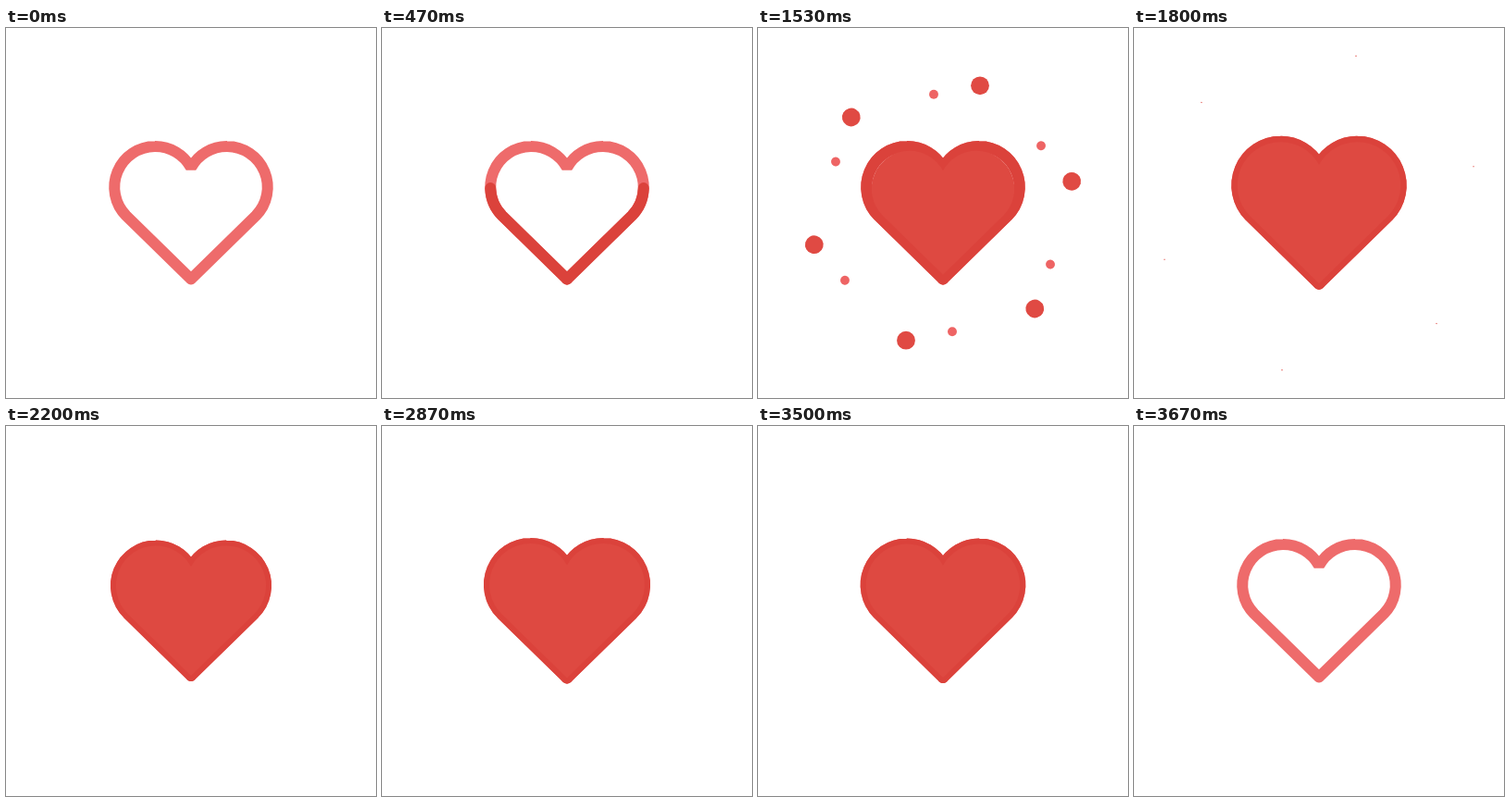
An HTML page that plays this animation: 400 px wide and 400 px high, repeating every 4.16 s.

```html
<!DOCTYPE html>
<html lang="en">
<head>
<meta charset="utf-8">
<title>Like button</title>
<style>
html, body { margin: 0; height: 100%; overflow: hidden; background: #fff; }
svg { display: block; width: 100vw; height: 100vh; }
</style>
</head>
<body>
<svg viewBox="0 0 400 400">
  <g id="sparks"></g>
  <g id="heart" fill="none" stroke-width="12" stroke-linecap="round" stroke-linejoin="bevel">
    <path id="base" stroke="#ee6b6b"/>
    <g id="trace" stroke="#db423b">
      <path pathLength="1"/>
      <path pathLength="1" transform="matrix(-1 0 0 1 400 0)"/>
    </g>
    <path id="fill" fill="#de4941"/>
  </g>
</svg>
<script>
const LOOP = 4160;
const $ = id => document.getElementById(id);
const clamp = x => Math.min(1, Math.max(0, x));
const span = (t, start, length) => clamp((t - start) / length);

// Cubic Bezier easing, solved by bisection
function bezier(x1, y1, x2, y2) {
  const at = (a, b, s) => 3 * a * s * (1 - s) ** 2 + 3 * b * s * s * (1 - s) + s ** 3;
  return x => {
    let lo = 0, hi = 1;
    for (let i = 0; i < 24; i++) {
      const mid = (lo + hi) / 2;
      if (at(x1, x2, mid) < x) lo = mid; else hi = mid;
    }
    return at(y1, y2, hi);
  };
}
const ease = bezier(.25, .1, .25, 1);
const easeOut = bezier(0, 0, .58, 1);

const half = "M200 271.5L130 203A44 44 0 0 1 161 128A44 44 0 0 1 200 151";
const whole = half + "A44 44 0 0 1 239 128A44 44 0 0 1 270 203L200 271.5";
$("base").setAttribute("d", whole);
$("fill").setAttribute("d", whole);
const traces = [...$("trace").children];
traces.forEach(p => p.setAttribute("d", half));

// Six arms, each with a large and a small dot
const sparks = [];
for (let i = 0; i < 6; i++) {
  for (const [x, end, size, color] of [[40, 170, 10, "#e04a43"], [-10, 156, 5, "#ee6464"]]) {
    const dot = document.createElementNS("http://www.w3.org/2000/svg", "circle");
    dot.setAttribute("cx", x);
    dot.setAttribute("fill", color);
    dot.setAttribute("transform", `translate(200 200) rotate(${i * 60})`);
    $("sparks").append(dot);
    sparks.push({ dot, end, size });
  }
}

const show = (el, on) => el.setAttribute("visibility", on ? "visible" : "hidden");
const zoom = (el, s) =>
  el.setAttribute("transform", `translate(200 200) scale(${s}) translate(-200 -200)`);

function heartScale(t) {
  if (t >= 1550 && t < 2417) {
    const d = t - 1550;
    return 1 + .154 * Math.exp(-.003 * d) * Math.sin(Math.PI * d / 400);
  }
  if (t >= 2850 && t < 3665) {
    const phase = (t - 2850) / 330 % 1;
    return 1 + .11 * (1 - Math.abs(1 - 2 * phase));
  }
  return 1;
}

function draw(t) {
  const liked = t < 3665;
  const traced = easeOut(span(t, 167, 833));
  show($("trace"), liked && t > 185);
  traces.forEach(p => p.setAttribute("stroke-dasharray", `${traced} 2`));

  show($("fill"), liked && t > 1350);
  zoom($("fill"), ease(span(t, 1333, 290)));
  zoom($("heart"), heartScale(t));

  const p = span(t, 1333, 500);
  const grow = p < .4 ? p / .4 : ((1 - p) / .6) ** 1.2;
  for (const { dot, end, size } of sparks) {
    const r = size * Math.min(1, grow);
    dot.setAttribute("cy", -70 - (end - 70) * ease(p));
    dot.setAttribute("r", r < .5 ? 0 : r);
  }
}

const start = performance.now();
function tick() {
  draw((performance.now() - start) % LOOP);
  requestAnimationFrame(tick);
}
tick();
</script>
</body>
</html>
```
